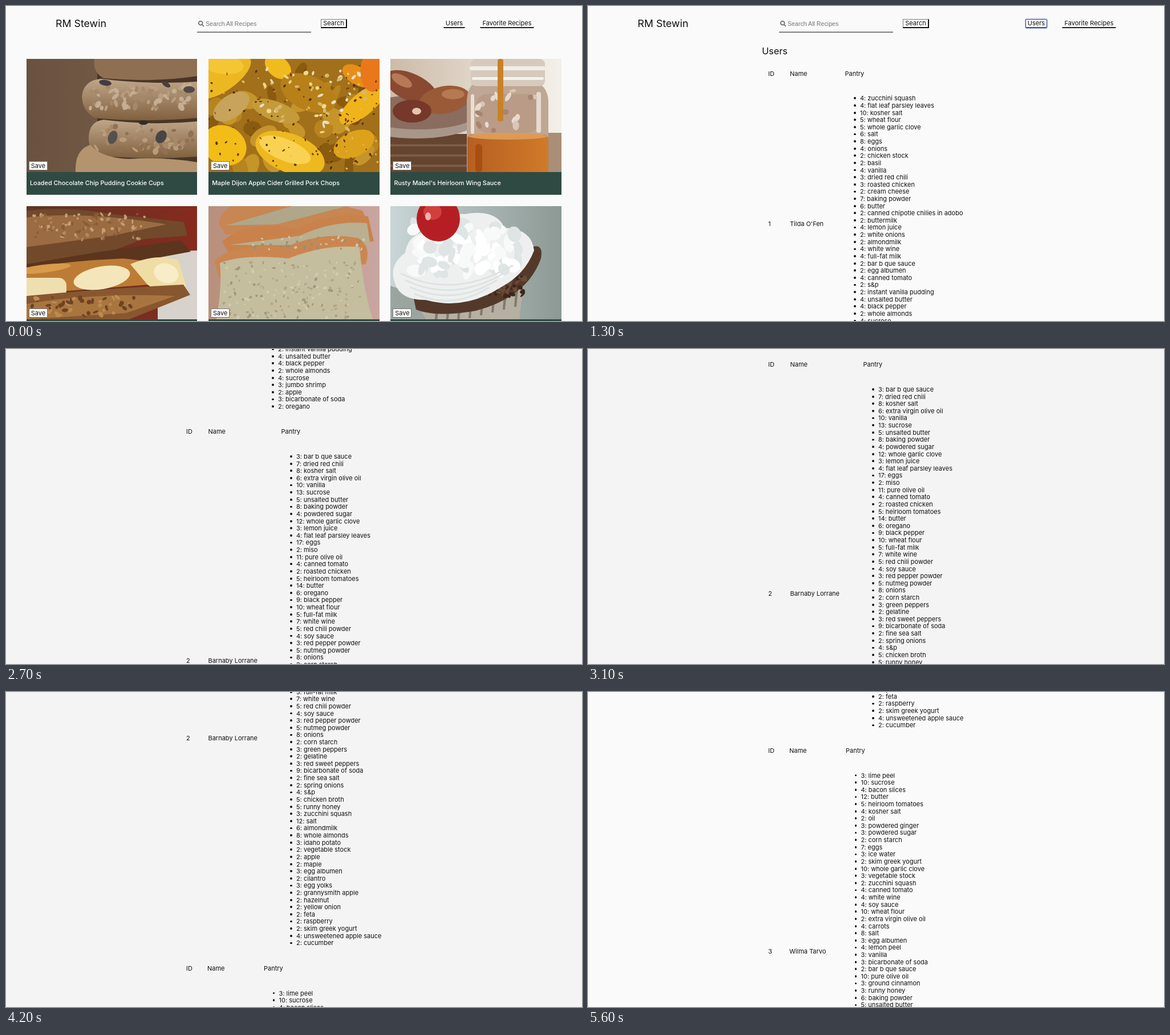
Animation, 1010 px wide and 554 px high, one loop 5700 ms. Source, as an HTML page:

```html
<!DOCTYPE html>
<html lang="en">
<head>
<meta charset="utf-8">
<title>Recipes</title>
<style>
html, body { margin: 0; width: 100%; height: 100%; overflow: hidden; }
body { position: relative; background: #fafafa; color: #111; font: 11px/14px Inter, "Open Sans", sans-serif; }
#page { position: absolute; left: 0; top: 0; width: 1010px; height: 554px; }
#page div, #page span, #page svg { position: absolute; white-space: nowrap; box-sizing: border-box; }
.item::before { content: ""; position: absolute; left: -11px; top: 5.2px; width: 3.8px; height: 3.8px; border-radius: 50%; background: #111; }
.search { left: 335px; top: 20px; width: 200px; height: 27px; border-bottom: 2px solid #808080; }
.btn { text-align: center; }
.go { left: 552px; top: 23px; width: 46px; height: 16px; line-height: 13px; border: 1px solid #555; border-width: 1px 2px 2px 1px; border-color: #777 #111 #111 #777; background: #fff; }
.link { top: 23px; height: 16px; line-height: 14px; border-bottom: 2px solid #222; border-radius: 2px; }
.link.focus { border: 1px solid #3a4f9e; box-shadow: 0 0 0 1px #b4c0e6; border-bottom-width: 2px; line-height: 13px; }
.card { width: 299.4px; height: 239px; background: #2f4a42; overflow: hidden; }
.card svg { left: 0; top: 0; }
.card .title { left: 6px; top: 212px; color: #fff; font-weight: 500; font-size: 10.8px; }
.card .save { left: 4px; top: 180px; width: 33px; height: 16px; line-height: 14px; border: 1px solid #777; background: #fff; }
</style>
</head>
<body>
<div id="page">
  <span style="left:87px;top:19px;font-size:17.8px;line-height:24px">RM Stewin</span>
  <div class="search">
    <svg width="14" height="14" style="left:1px;top:4px" fill="none" stroke="#707070" stroke-width="1.8">
      <circle cx="5.2" cy="6" r="3.4"/><path d="M7.8 8.6L11 12"/>
    </svg>
    <span style="left:15px;top:4px;color:#757575;font:10.65px/14px 'Liberation Sans',Arial,sans-serif">Search All Recipes</span>
  </div>
  <div class="btn go">Search</div>
  <div class="btn link" id="tab" style="left:767px;width:38px">Users</div>
  <div class="btn link" style="left:831px;width:95px">Favorite Recipes</div>
  <div id="home"></div>
  <div id="users"><span style="left:305px;top:69px;font-size:16.3px;line-height:20px">Users</span></div>
</div>
<script>
const $ = id => document.getElementById(id);
const page = $('page'), home = $('home'), users = $('users'), tab = $('tab');

// ---- shapes for the card pictures, 300 x 199 ----
const box = (x, y, w, h, fill, r = 0) => `<rect x="${x}" y="${y}" width="${w}" height="${h}" rx="${r}" fill="${fill}"/>`;
const oval = (x, y, rx, ry, fill, turn = 0) =>
  `<ellipse cx="${x}" cy="${y}" rx="${rx}" ry="${ry}" fill="${fill}" transform="rotate(${turn} ${x} ${y})"/>`;
const path = (d, fill, extra = '') => `<path d="${d}" fill="${fill}" ${extra}/>`;
let seed = 7;
const rnd = () => (seed = seed * 16807 % 2147483647) / 2147483647;
// n small spots scattered inside a rectangle
const spots = (n, x, y, w, h, r, fills) => Array.from({ length: n }, () =>
  oval(x + rnd() * w, y + rnd() * h, r * (.5 + rnd()), r * (.4 + rnd() * .6), fills[rnd() * fills.length | 0], rnd() * 180)).join('');
const fade = (id, a, b, down) =>
  `<linearGradient id="${id}" x2="${down ? 0 : 1}" y2="${down ? 1 : 0}"><stop stop-color="${a}"/><stop offset="1" stop-color="${b}"/></linearGradient>`;
const ground = (id, a, b) => fade(id, a, b) + box(0, 0, 300, 199, `url(#${id})`);

const cookies = () => ground('wood', '#69523f', '#7a604b') +
  fade('dough', '#c0a68a', '#80603f', true) +
  box(124, 20, 180, 170, '#4a3525') +
  path('M119 0H300V30Q220 42 135 34Q116 24 119 0Z', '#8f6f51') +
  path('M97 66Q100 38 130 35Q220 46 300 40V104Q200 112 120 104Q98 92 97 66Z', 'url(#dough)') +
  path('M109 138Q110 110 135 107Q220 118 300 110V172Q210 178 125 170Q108 158 109 138Z', 'url(#dough)') +
  path('M86 199Q84 160 112 151Q130 174 180 176Q240 172 300 182V199Z', '#b3946f') +
  spots(60, 112, 46, 180, 44, 5, ['#b99e80', '#a68768', '#c5ae93']) +
  spots(60, 122, 118, 170, 46, 5, ['#a98a67', '#917152', '#b89c7c']) +
  oval(138, 42, 11, 5, '#413d40', 10) + oval(151, 138, 8, 12, '#57504f', 20) + oval(236, 137, 9, 12, '#4a4545', 30) +
  oval(285, 54, 10, 6, '#514a48') + oval(205, 112, 8, 4, '#332c2b') + oval(245, 45, 8, 4, '#463f3e', 30);

const chops = () => box(0, 0, 300, 199, '#a2701a') +
  spots(60, 0, 0, 300, 199, 18, ['#b88420', '#8a5a0f', '#c6952a', '#7b5117']) +
  oval(25, 32, 58, 24, '#edb722', -35) + oval(22, 8, 40, 18, '#f4c634', 10) + oval(122, 14, 26, 18, '#f1bb1d', 40) +
  oval(40, 84, 36, 20, '#c7a35b', -35) + oval(118, 92, 44, 17, '#c59a3a', 20) + oval(175, 60, 52, 30, '#b78019', 25) +
  oval(270, 80, 50, 20, '#efb31b', -40) + oval(262, 30, 30, 16, '#e88e18', 30) + oval(288, 22, 22, 36, '#e9781b') +
  oval(143, 166, 64, 34, '#eeb91f', 22) + oval(134, 160, 48, 19, '#fad253', 22) +
  oval(28, 152, 40, 34, '#f2bd17', 30) + oval(255, 150, 38, 22, '#dda21c', -25) +
  spots(150, 0, 20, 300, 175, 2, ['#54310b', '#7b3d10', '#e5b84d']) +
  spots(45, 90, 15, 190, 120, 4, ['#e9dfc7', '#d9b768', '#f1d98c']);

const sauce = () => ground('room', '#cdbba8', '#f4f0ea') +
  box(0, 132, 300, 70, '#65452f') + path('M230 130H300V199H270Z', '#a98e78') +
  oval(45, 104, 112, 36, '#a9968a') + oval(50, 94, 104, 30, '#8a6d5e') +
  oval(36, 50, 50, 24, '#8a4931', 25) + oval(95, 72, 45, 24, '#9a5a38', -10) + oval(38, 92, 34, 20, '#75382a') +
  oval(20, 38, 20, 9, '#b57957', 30) + oval(110, 62, 20, 9, '#b67a52') + oval(46, 92, 8, 6, '#e5c5ae') +
  [150, 168, 186].map(y => box(0, y, 135, 4, '#7d5c45')).join('') +
  path('M145 44Q133 55 134 80V199H277V80Q278 55 262 44Z', '#c0a694') +
  box(141, 0, 130, 48, '#d6cabd', 9) + box(139, 13, 133, 7, '#f1eee8', 4) + box(143, 32, 126, 5, '#f5f2ec', 3) +
  box(150, 62, 110, 68, '#b99b87', 20) + box(141, 62, 6, 70, '#e9dfd5', 4) + box(256, 58, 8, 72, '#e6dbd0', 4) +
  spots(18, 150, 52, 104, 74, 6, ['#d8c6b7', '#a88471', '#e7dacf']) +
  fade('glaze', '#b65f22', '#d07a2a') + box(135, 133, 142, 80, 'url(#glaze)', 8) +
  oval(206, 136, 69, 6, '#dd9a55') + box(149, 150, 12, 49, '#a94e13', 5) + box(188, 0, 10, 110, '#c98128', 4);

const pancakes = () => ground('plate', '#5c3524', '#872a1e') +
  path('M230 80L300 78V199H230Z', '#d8d2cc') +
  path('M0 8Q70 0 150 14L276 28L282 52L205 58L115 92L0 106Z', '#72492b') +
  path('M0 20Q100 8 245 32L150 52L0 72Z', '#9b6c42') +
  spots(90, 8, 14, 200, 45, 3, ['#b28761', '#8a5b36', '#c79e77']) +
  path('M0 102L130 80L270 60L288 80L180 100L80 124H0Z', '#5b351e') +
  path('M0 108Q80 96 170 92L240 100L215 138L60 150H0Z', '#bd7c35') +
  box(-20, 126, 90, 36, '#efdfb0', 14) + oval(132, 126, 50, 20, '#f4e5bb', -10) +
  path('M182 102Q230 82 266 95L280 140Q240 158 212 138Z', '#f0dda5') +
  oval(245, 118, 22, 17, '#f8edc8', 20) + oval(30, 110, 48, 7, '#d99a49', -7) +
  path('M0 158Q130 145 275 138L287 156Q240 175 180 199H0Z', '#88572f') +
  path('M0 172Q120 152 260 158L175 188L0 199Z', '#a9753f') + spots(50, 5, 160, 190, 34, 4, ['#6d4323', '#bd8a51']);

const bread = () => ground('cloth', '#b98f7c', '#c9a5a0') +
  path('M18 30Q25 -6 70 -5L210 -8L270 8L285 40L30 50Z', '#c78652') + path('M30 34L160 -4H258L120 32Z', '#b0a68a') +
  path('M24 62Q70 22 155 40Q210 10 280 18L290 62L35 82Z', '#c9824b') + path('M38 68L160 52Q220 24 278 30L284 70Z', '#b8b090') +
  path('M10 98Q35 66 138 71Q200 44 262 56Q286 70 276 102L20 126Z', '#cb8650') +
  path('M20 100Q60 84 140 92Q205 66 265 72Q270 140 288 199H14Q24 140 20 100Z', '#c4bd9e') +
  spots(170, 26, 98, 240, 98, 2.5, ['#b0a788', '#d3ccae', '#a0977a']) + spots(40, 60, 54, 215, 22, 2.5, ['#998f73', '#cfc8aa']);

const cupcake = () => ground('sky', '#c9d5d6', '#8c9994') +
  path('M0 140L60 160L80 199H0Z', '#9aa5a0') +
  path('M42 165L238 100L226 199H62Z', '#b6b0a2') +
  [0, 1, 2, 3, 4, 5, 6, 7].map(i => path(`M${80 + i * 20} ${174 - i * 5}l5 -2l-4 40h-4Z`, '#7f7b70')).join('') +
  path('M40 158Q130 190 235 78Q270 58 264 92Q240 160 150 184Q80 196 45 182Z', '#54392a') +
  spots(60, 170, 120, 65, 38, 4, ['#6b4b36', '#3d271d']) +
  path('M8 135Q-4 104 26 82Q30 52 60 45Q80 10 130 14Q185 4 200 38Q248 40 252 78Q236 120 195 142Q130 184 62 165Q16 165 8 135Z', '#eef0ef') +
  spots(90, 40, 30, 185, 85, 12, ['#fff', '#dfe4e4', '#f8f9f9']) +
  [0, 1, 2, 3].map(i => path(`M${18 + i * 8} ${118 + i * 12}Q110 ${165 + i * 6} ${215 - i * 14} ${104 + i * 13}`, 'none', 'stroke="#dde2e2" stroke-width="3"')).join('') +
  oval(84, 22, 38, 40, '#b51f24') + oval(74, 10, 16, 14, '#d2403d') + oval(66, 18, 5, 7, '#f0b3a8');

const cards = [
  ['Loaded Chocolate Chip Pudding Cookie Cups', cookies],
  ['Maple Dijon Apple Cider Grilled Pork Chops', chops],
  ["Rusty Mabel's Heirloom Wing Sauce", sauce],
  ['', pancakes], ['', bread], ['', cupcake]
];
home.innerHTML = cards.map(([title, draw], i) =>
  `<div class="card" style="left:${36 + i % 3 * 319.2}px;top:${i < 3 ? 93 : 352}px">
    <svg width="300" height="199">${draw()}</svg>
    <div class="btn save">Save</div><span class="title">${title}</span></div>`).join('');

// ---- user tables ----
const lists = [
  `4: zucchini squash,4: flat leaf parsley leaves,10: kosher salt,5: wheat flour,5: whole garlic clove,6: salt,8: eggs,4: onions,
2: chicken stock,2: basil,4: vanilla,3: dried red chili,3: roasted chicken,2: cream cheese,7: baking powder,6: butter,
2: canned chipotle chilies in adobo,2: buttermilk,4: lemon juice,2: white onions,2: almondmilk,4: white wine,4: full-fat milk,
2: bar b que sauce,2: egg albumen,4: canned tomato,2: s&amp;p,2: instant vanilla pudding,4: unsalted butter,4: black pepper,
2: whole almonds,4: sucrose,3: jumbo shrimp,2: apple,3: bicarbonate of soda,2: oregano`,
  `3: bar b que sauce,7: dried red chili,8: kosher salt,6: extra virgin olive oil,10: vanilla,13: sucrose,5: unsalted butter,
8: baking powder,4: powdered sugar,12: whole garlic clove,3: lemon juice,4: flat leaf parsley leaves,17: eggs,2: miso,
11: pure olive oil,4: canned tomato,2: roasted chicken,5: heirloom tomatoes,14: butter,6: oregano,9: black pepper,
10: wheat flour,5: full-fat milk,7: white wine,5: red chili powder,4: soy sauce,3: red pepper powder,5: nutmeg powder,8: onions,
2: corn starch,3: green peppers,2: gelatine,3: red sweet peppers,9: bicarbonate of soda,2: fine sea salt,2: spring onions,
4: s&amp;p,5: chicken broth,5: runny honey,3: zucchini squash,12: salt,6: almondmilk,8: whole almonds,3: idaho potato,
2: vegetable stock,2: apple,2: maple,3: egg albumen,2: cilantro,3: egg yolks,2: grannysmith apple,2: hazelnut,2: yellow onion,
2: feta,2: raspberry,2: skim greek yogurt,4: unsweetened apple sauce,2: cucumber`,
  `3: lime peel,10: sucrose,4: bacon slices,12: butter,5: heirloom tomatoes,4: kosher salt,2: oil,3: powdered ginger,
3: powdered sugar,2: corn starch,7: eggs,3: ice water,2: skim greek yogurt,10: whole garlic clove,3: vegetable stock,
2: zucchini squash,4: canned tomato,4: white wine,4: soy sauce,10: wheat flour,2: extra virgin olive oil,4: carrots,8: salt,
3: egg albumen,4: lemon peel,3: vanilla,3: bicarbonate of soda,2: bar b que sauce,10: pure olive oil,3: ground cinnamon,
3: runny honey,6: baking powder,5: unsalted butter`
];
const rowStep = 12.62;
const text = (x, y, s, cls = '') => `<span class="${cls}" style="left:${x}px;top:${y - 7}px">${s}</span>`;
// head: y of the heading row, mid: y of the name row
const table = (id, name, head, mid, nameX, pantryX) =>
  text(316, head, 'ID') + text(nameX, head, 'Name') + text(pantryX, head, 'Pantry') +
  text(316, mid, id) + text(nameX, mid, name) +
  lists[id - 1].split(',').map((s, i) => text(pantryX + 26.5, head + 43.8 + i * rowStep, s.trim(), 'item')).join('');
users.innerHTML += table(1, "Tilda O'Fen", 118.5, 383, 354, 450.5) +
  table(2, 'Barnaby Lorrane', 648.2, 1051.3, 354.5, 482.5) +
  table(3, 'Wilma Tarvo', 1455.7, 1808.5, 353, 452);

// ---- motion ----
const loop = 5700, openAt = 1300;
const stops = [[openAt, 0], [2200, 341], [3100, 621], [3700, 782], [4700, 1153], [5600, 1352.5]];
const slope = i => (stops[i + 1][1] - stops[i][1]) / (stops[i + 1][0] - stops[i][0]);
// scroll speed at a stop: starts from rest, then follows its neighbours
const speed = i => i === 0 ? 0 : i === stops.length - 1 ? slope(i - 1) : (slope(i - 1) + slope(i)) / 2;

function scrollAt(t) {
  if (t <= openAt) return 0;
  const i = stops.findIndex(s => t <= s[0]) - 1;
  const [t0, y0] = stops[i], [t1, y1] = stops[i + 1];
  const span = t1 - t0, u = (t - t0) / span, v = 1 - u;
  return y0 + (y1 - y0) * u * u * (3 - 2 * u) + span * u * v * (speed(i) * v - speed(i + 1) * u);
}
function draw(now) {
  const t = Math.floor(now % loop / 100) * 100;
  const open = t >= openAt;
  home.style.display = open ? 'none' : '';
  users.style.display = open ? '' : 'none';
  tab.classList.toggle('focus', open);
  page.style.transform = `translateY(${-Math.round(scrollAt(t))}px)`;
  document.body.style.background = t >= 1600 && t < 4300 ? '#f4f4f4' : '#fafafa';
  requestAnimationFrame(draw);
}
draw(performance.now());
</script>
</body>
</html>
```
